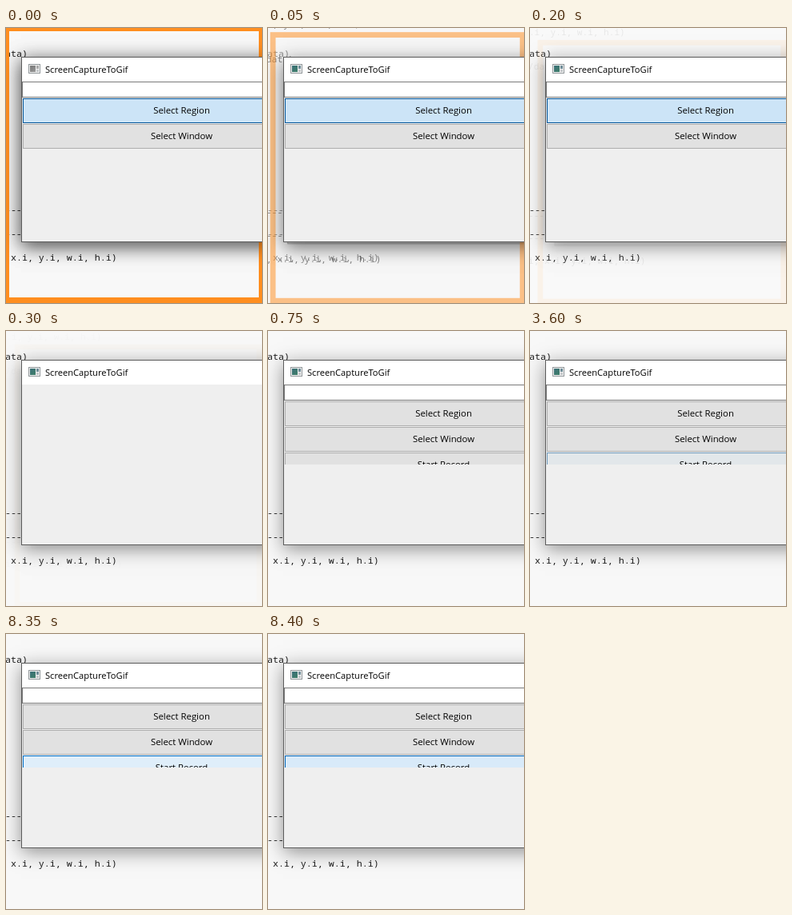
Write an HTML page with a canvas that moves like this. It is 320 px wide and 344 px high and loops after 8.45 s.

```html
<!DOCTYPE html>
<html lang="en">
<head>
<meta charset="utf-8">
<title>Screen recorder window</title>
<style>
  html, body { margin: 0; width: 100%; height: 100%; overflow: hidden; background: #f8f8f8; }
  canvas { display: block; }
</style>
</head>
<body>
<canvas id="stage" width="320" height="344"></canvas>
<script>
const ctx = document.getElementById('stage').getContext('2d');
const LOOP = 8450, STEP = 50;
const MONO = '11.65px "Noto Sans Mono", monospace';
const UI = '"Open Sans", sans-serif';

// Button states: fill and border as RGB
const NORMAL = { fill: [225, 225, 225], edge: [173, 173, 173] };
const HOVER = { fill: [229, 241, 251], edge: [0, 120, 215] };
const PRESSED = { fill: [204, 228, 247], edge: [0, 84, 153] };

// Held values [time, amount] for the "Start Record" button
const HOVER_KEYS = [[0, 0], [3600, .36], [3650, 1], [3800, .8], [3850, .55],
  [3900, .3], [4000, 0], [4200, .36], [4250, 1]];
const PRESS_KEYS = [[0, 0], [8350, .25], [8400, .52]];

const held = (keys, t) => keys.filter(k => k[0] <= t).pop()[1];
const mix = (a, b, k) => a.map((v, i) => v + (b[i] - v) * k);
const blend = (a, b, k) => ({ fill: mix(a.fill, b.fill, k), edge: mix(a.edge, b.edge, k) });
const rgb = c => `rgb(${c.map(Math.round)})`;

function rect(x, y, w, h, color) {
  ctx.fillStyle = color;
  ctx.fillRect(x, y, w, h);
}

function outlined(x, y, w, h, fill, edge) {
  rect(x, y, w, h, edge);
  rect(x + 1, y + 1, w - 2, h - 2, fill);
}

function text(str, x, y, font, color = '#000', align = 'left') {
  ctx.font = font;
  ctx.fillStyle = color;
  ctx.textAlign = align;
  ctx.fillText(str, x, y);
}

function editor() {
  rect(-60, -60, 500, 520, '#f8f8f8');
  const line = (str, x, y) => text(str, x, y, MONO, '#1c1c1c');
  line('i, x.i, y.i, w.i, h.i)', -42, -9);
  line('/data)', -15, 36);
  line('---------', -43, 231);
  line('---------', -43, 261);
  line('i, x.i, y.i, w.i, h.i)', -15, 291);
}

function frameShadow() {
  ctx.save();
  ctx.shadowColor = 'rgba(0,0,0,.42)';
  ctx.shadowBlur = 22;
  ctx.shadowOffsetY = 5;
  rect(19, 36, 400, 232, '#5c5c5c');
  ctx.restore();
  rect(20, 37, 400, 230, '#efefef');
}

// Selection overlay with its snapshot of the screen, shrinking and fading out
function overlay(t) {
  const scale = 1 - .055 * (1 - Math.exp(-t / 100));
  ctx.save();
  ctx.globalAlpha = Math.exp(-t / 77);
  ctx.translate(260, 374);
  ctx.scale(scale, scale);
  ctx.translate(-260, -374);
  editor();
  frameShadow();
  ctx.strokeStyle = '#ff8e1f';
  ctx.lineWidth = 7;
  ctx.strokeRect(.5, .5, 319, 340);
  ctx.restore();
}

function button(label, y, state) {
  outlined(21, y, 397, 31, rgb(state.fill), rgb(state.edge));
  text(label, 219.5, y + 19, '11.4px ' + UI, '#000', 'center');
}

function icon(active) {
  outlined(28, 45, 15, 12, '#f1f1f1', '#92989b');
  const fill = ctx.createLinearGradient(29, 47, 37, 56);
  fill.addColorStop(0, active ? '#3c6f7a' : '#777');
  fill.addColorStop(1, active ? '#3f8068' : '#999');
  rect(30, 47, 7, 8, fill);
  rect(38, 47, 3, 4, active ? '#6f8d98' : '#aaa');
  rect(38, 52, 3, 3, '#c4c8ca');
}

function appWindow(t) {
  frameShadow();
  rect(20, 37, 400, 30, '#fff');
  icon(t > 0);
  text('ScreenCaptureToGif', 49, 56, '11.15px ' + UI);
  if (t >= 250 && t < 350) return; // content is blank while the layout changes

  const release = Math.min(1, Math.max(0, (t - 350) / 400));
  outlined(20, 67, 400, 20, '#fff', '#7a7a7a');
  button('Select Region', 88, blend(PRESSED, NORMAL, release));
  button('Select Window', 120, NORMAL);
  if (t < 350) return;

  ctx.save();
  ctx.beginPath();
  ctx.rect(20, 37, 400, 130);
  ctx.clip();
  const hover = blend(NORMAL, HOVER, held(HOVER_KEYS, t));
  button('Start Record', 152, blend(hover, PRESSED, held(PRESS_KEYS, t)));
  ctx.restore();
}

function draw(now) {
  const t = Math.floor((now % LOOP) / STEP) * STEP;
  editor();
  if (t < 400) overlay(t);
  appWindow(t);
}

const start = performance.now();
function tick() {
  draw(performance.now() - start);
  requestAnimationFrame(tick);
}
tick();
</script>
</body>
</html>
```
